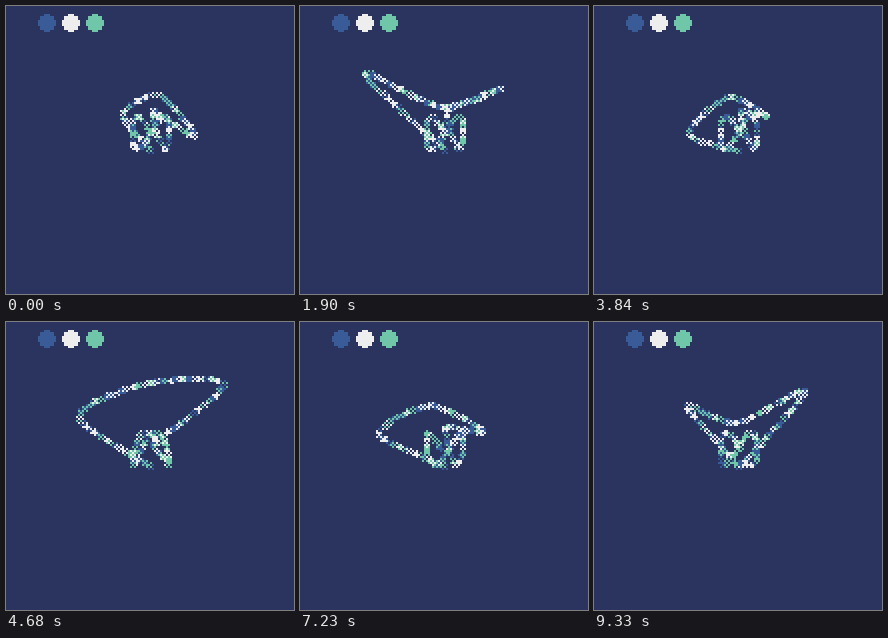
An HTML page with a canvas for the animation above (9360 ms loop, 288 px wide and 288 px high).

```html
<!DOCTYPE html>
<html lang="en">
<head>
<meta charset="utf-8">
<title>Dotted wings</title>
<style>
  html, body { margin: 0; width: 100%; height: 100%; overflow: hidden; background: #2b335f; }
  canvas { display: block; width: 288px; height: 288px; image-rendering: pixelated; }
</style>
</head>
<body>
<canvas id="stage" width="144" height="144"></canvas>
<script>
const LOOP = 9360, TICK = 30, DOT_GAP = 3, SWELL = 0.6;
const BACK = '#2b335f', BLUE = '#395c98', WHITE = '#eeeeee', GREEN = '#70c6a9';
const BOTTOM = [146, 145], VALLEY = [146, 104];
const ctx = document.getElementById('stage').getContext('2d');

const mix = (a, b, p) => a + (b - a) * p;
const mixPoint = (a, b, p) => [mix(a[0], b[0], p), mix(a[1], b[1], p)];
const hash = n => {
  const v = Math.sin(n * 127.1 + 31.7) * 43758.5453;
  return v - Math.floor(v);
};

// arch: the wings join in a bow over the middle; fold: the right wing returns to the valley
const poses = [
  { time: 0, left: [117, 108], right: [190, 131], arch: 1, fold: 1 },
  { time: 1890, left: [64, 67], right: [201, 82], arch: 0, fold: 1 },
  { time: 3840, left: [95, 128], right: [174, 111], arch: 1, fold: 1 },
  { time: 5640, left: [106, 96], right: [211, 73], arch: 0, fold: 0 },
  { time: 7230, left: [79, 112], right: [184, 110], arch: 1, fold: 1 },
  { time: 8370, left: [128, 108], right: [163, 104], arch: 0, fold: 0 },
  { time: 9330, left: [93, 84], right: [211, 69], arch: 0, fold: 0 }
];

function poseAt(time) {
  const next = Math.max(1, poses.findIndex(pose => pose.time > time));
  const k = time >= poses[poses.length - 1].time ? poses.length - 1 : next;
  const from = poses[k - 1], to = poses[k];
  const p = Math.min(1, (time - from.time) / (to.time - from.time));
  const spread = 1 + SWELL * Math.sin(Math.PI * p) ** 2;
  const tip = side => mixPoint(BOTTOM, mixPoint(from[side], to[side], p), spread);
  return {
    left: tip('left'),
    right: tip('right'),
    arch: mix(from.arch, to.arch, p),
    fold: mix(from.fold, to.fold, p)
  };
}

// Cardinal spline between b and c.
function spline([a, b, c, d], u, tension = 0.42) {
  const u2 = u * u, u3 = u2 * u;
  return [0, 1].map(k =>
    (2 * u3 - 3 * u2 + 1) * b[k] + (3 * u2 - 2 * u3) * c[k]
    + tension * ((u3 - 2 * u2 + u) * (c[k] - a[k]) + (u3 - u2) * (d[k] - b[k])));
}

function wings({ left, right, arch, fold }) {
  const apex = [(left[0] + right[0]) / 2,
    Math.min(left[1], right[1]) - (right[0] - left[0]) / 4];
  const middle = mixPoint([142, 101], apex, arch);
  const end = mixPoint(BOTTOM, VALLEY, fold);
  const knots = [BOTTOM, BOTTOM, left, middle, right, end, end];
  const path = [];
  for (let i = 0; i + 3 < knots.length; i++)
    for (let s = 0; s < 40; s++) path.push(spline(knots.slice(i, i + 4), s / 40));
  path.push(end);
  return path;
}

// Figure eight below the valley, drawn out of the end of the wings.
function body(start, time) {
  const path = [], turn = 0.35 * Math.sin(time / 600);
  for (let i = 0; i <= 100; i++) {
    const angle = i / 100 * Math.PI * 2;
    const loop = [145 + 19 * Math.sin(angle + turn), 127 + 16 * Math.sin(2 * angle - turn)];
    path.push(mixPoint(start, loop, Math.min(1, i / 12)));
  }
  return path;
}

function cell(x, y, color) {
  ctx.fillStyle = color;
  ctx.fillRect(x, y, 1, 1);
}

function disc(cx, cy, color) {
  for (let y = -4; y <= 4; y++)
    for (let x = -4; x <= 4; x++)
      if (x * x + y * y <= 18) cell(cx + x, cy + y, color);
}

function dot([px, py], i) {
  const x = Math.floor(px / 2), y = Math.floor(py / 2);
  const tone = hash(i), solid = tone < 0.05;
  const color = tone < 0.25 ? BLUE : tone < 0.62 ? WHITE : GREEN;
  const parity = hash(i + 500) < 0.6 ? 0 : 1;
  for (let dy = -1; dy <= 1; dy++)
    for (let dx = -1; dx <= 1; dx++)
      if (solid || (x + dx + y + dy) % 2 === parity) cell(x + dx, y + dy, color);
}

function draw(time) {
  ctx.fillStyle = BACK;
  ctx.fillRect(0, 0, 144, 144);
  [BLUE, WHITE, GREEN].forEach((color, i) => disc(20 + 12 * i, 8, color));

  const outline = wings(poseAt(time));
  const path = outline.concat(body(outline[outline.length - 1], time));
  let walked = 0, count = 0;
  for (let i = 1; i < path.length; i++) {
    walked += Math.hypot(path[i][0] - path[i - 1][0], path[i][1] - path[i - 1][1]);
    if (walked >= count * DOT_GAP) {
      dot(path[i], count);
      count = Math.floor(walked / DOT_GAP) + 1;
    }
  }
}

const start = performance.now();
function frame() {
  const time = (performance.now() - start) % LOOP;
  draw(Math.floor(time / TICK) * TICK);
  requestAnimationFrame(frame);
}
frame();
</script>
</body>
</html>
```
